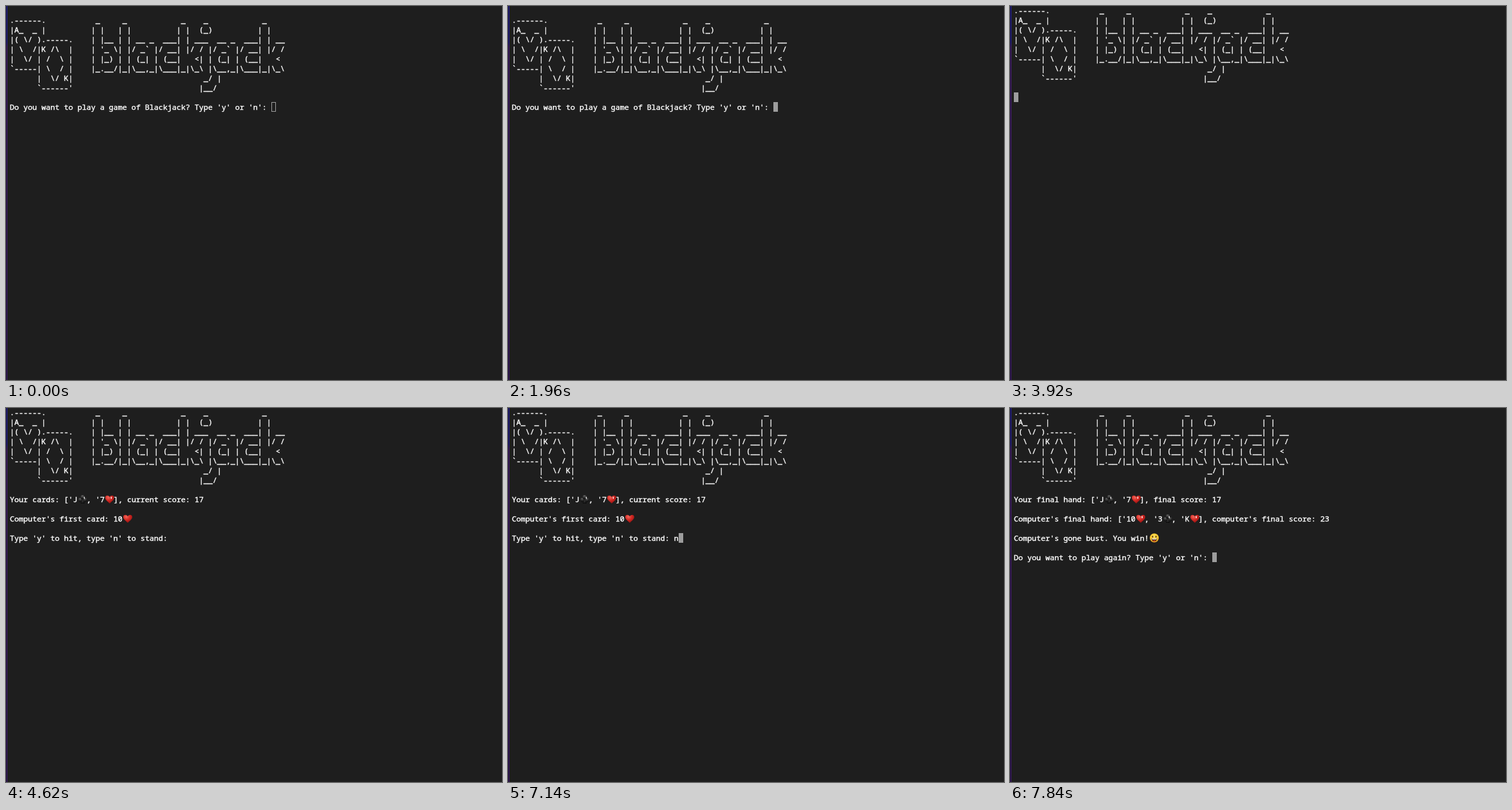
Recreate the animation shown at these times as an HTML page. Size 770 by 580 pixels, loop 8 s.

```html
<!DOCTYPE html>
<html lang="en">
<head>
<meta charset="utf-8">
<title>Blackjack</title>
<style>
html, body { margin: 0; width: 100%; height: 100%; overflow: hidden; background: #1e1e1e; }
#edge { position: absolute; left: 0; top: 0; width: 1px; height: 100%; border-left: 1px solid #140f20;
  background: linear-gradient(#2420b4 0 56px, #55208c 64px, #4c1c80 260px, #43187a); }
pre { position: absolute; left: 6px; top: -1px; margin: 0; color: #fff;
  font: 500 11.667px/15px "Noto Sans Mono", "DejaVu Sans Mono", monospace;
  font-variant-ligatures: none; -webkit-text-stroke: .4px #fff; }
pre svg { width: 16px; height: 15px; margin-right: -9px; vertical-align: top; }
i { display: inline-block; box-sizing: border-box; width: 7px; height: 15px;
  vertical-align: top; border: 1px solid #9d9d9d; }
i.on { background: #9d9d9d; }
</style>
</head>
<body>
<svg width="0" height="0" style="position:absolute">
  <defs>
    <radialGradient id="red" cx=".35" cy=".25" r=".8">
      <stop stop-color="#f0685c"/><stop offset=".45" stop-color="#d52a24"/><stop offset="1" stop-color="#8f1010"/>
    </radialGradient>
    <radialGradient id="black" cx=".45" cy=".2" r=".8">
      <stop stop-color="#666"/><stop offset=".5" stop-color="#303030"/><stop offset="1" stop-color="#080808"/>
    </radialGradient>
    <radialGradient id="gold" cy=".4" r=".6">
      <stop stop-color="#ffe45c"/><stop offset=".7" stop-color="#fbc934"/><stop offset="1" stop-color="#d98c16"/>
    </radialGradient>
  </defs>
</svg>
<div id="edge"></div>
<pre id="screen"></pre>
<script>
const logo = String.raw`
.------.           _     _            _    _            _
|A_  _ |          | |   | |          | |  (_)          | |
|( \/ ).-----.    | |__ | | __ _  ___| | ___  __ _  ___| | __
| \  /|K /\  |    | '_ \| |/ _~ |/ __| |/ / |/ _~ |/ __| |/ /
|  \/ | /  \ |    | |_) | | (_| | (__|   <| | (_| | (__|   <
~-----| \  / |    |_.__/|_|\__,_|\___|_|\_\ |\__,_|\___|_|\_\
      |  \/ K|                             _/ |
      ~------'                            |__/

`.replaceAll("~", "`").slice(1);

const ask = "Do you want to play a game of Blackjack? Type 'y' or 'n': ";
const deal = `Your cards: ['J♣', '7♥'], current score: 17

Computer's first card: 10♥

Type 'y' to hit, type 'n' to stand: `;
const result = `Your final hand: ['J♣', '7♥'], final score: 17

Computer's final hand: ['10♥', '3♣', 'K♥'], computer's final score: 23

Computer's gone bust. You win!☺

Do you want to play again? Type 'y' or 'n': `;

const icons = {
  "♥": '<path fill="url(#red)" d="M8 14C5 11 1 8.500 1 5C1 1 6 .5 8 4C10 .5 15 1 15 5C15 8.500 11 11 8 14Z"/>',
  "♣": `<g fill="url(#black)"><path d="M7 7H9L11 14H5Z"/><circle cx="4.500" cy="8.500" r="3.300"/>
    <circle cx="11.500" cy="8.500" r="3.300"/><circle cx="8" cy="4.300" r="3.400"/></g>`,
  "☺": `<circle cx="8" cy="7.500" r="7" fill="url(#gold)"/>
    <g fill="#5c3510"><ellipse cx="5.400" cy="5.500" rx="1" ry="1.500"/><ellipse cx="10.600" cy="5.500" rx="1" ry="1.500"/>
    <path d="M3.500 8.500H12.500Q11.500 13 8 13T3.500 8.500Z"/></g>
    <path fill="#fff" d="M4.500 8.500H11.500V9.800H4.500Z"/><path fill="#e2453c" d="M6 12Q8 10 10 12Q8 13.500 6 12Z"/>`
};

// Each step: start time in ms, text after the logo, cursor ("" hides it)
const hollow = '<i></i>', solid = '<i class="on"></i>';
const steps = [
  [0, ask, hollow], [910, ask, solid], [1470, ask, ""], [1960, ask, solid], [2520, ask, ""],
  [3010, ask + "y", solid],
  [3920, "", solid],
  [3990, deal, solid], [4620, deal, ""], [5110, deal, solid], [5670, deal, ""],
  [6160, deal, solid], [6720, deal, ""], [7140, deal + "n", solid],
  [7770, "", solid],
  [7840, result, solid]
];

const escapeHtml = s => s.replaceAll("&", "&amp;").replaceAll("<", "&lt;");
const drawIcons = s => s.replace(/[♥♣☺]/g, c => `<svg viewBox="0 0 16 15" stroke="none">${icons[c]}</svg>`);
const screen = document.getElementById("screen");
let shown;

function frame() {
  const t = performance.now() % 8000;
  const step = steps.findLast(s => s[0] <= t);
  if (step !== shown) {
    shown = step;
    const [start, text, cursor] = step;
    // The blank first row goes once the game begins
    const lead = start < 3920 ? "\n" : "";
    screen.innerHTML = lead + drawIcons(escapeHtml(logo + text)) + cursor;
  }
  requestAnimationFrame(frame);
}
frame();
</script>
</body>
</html>
```
